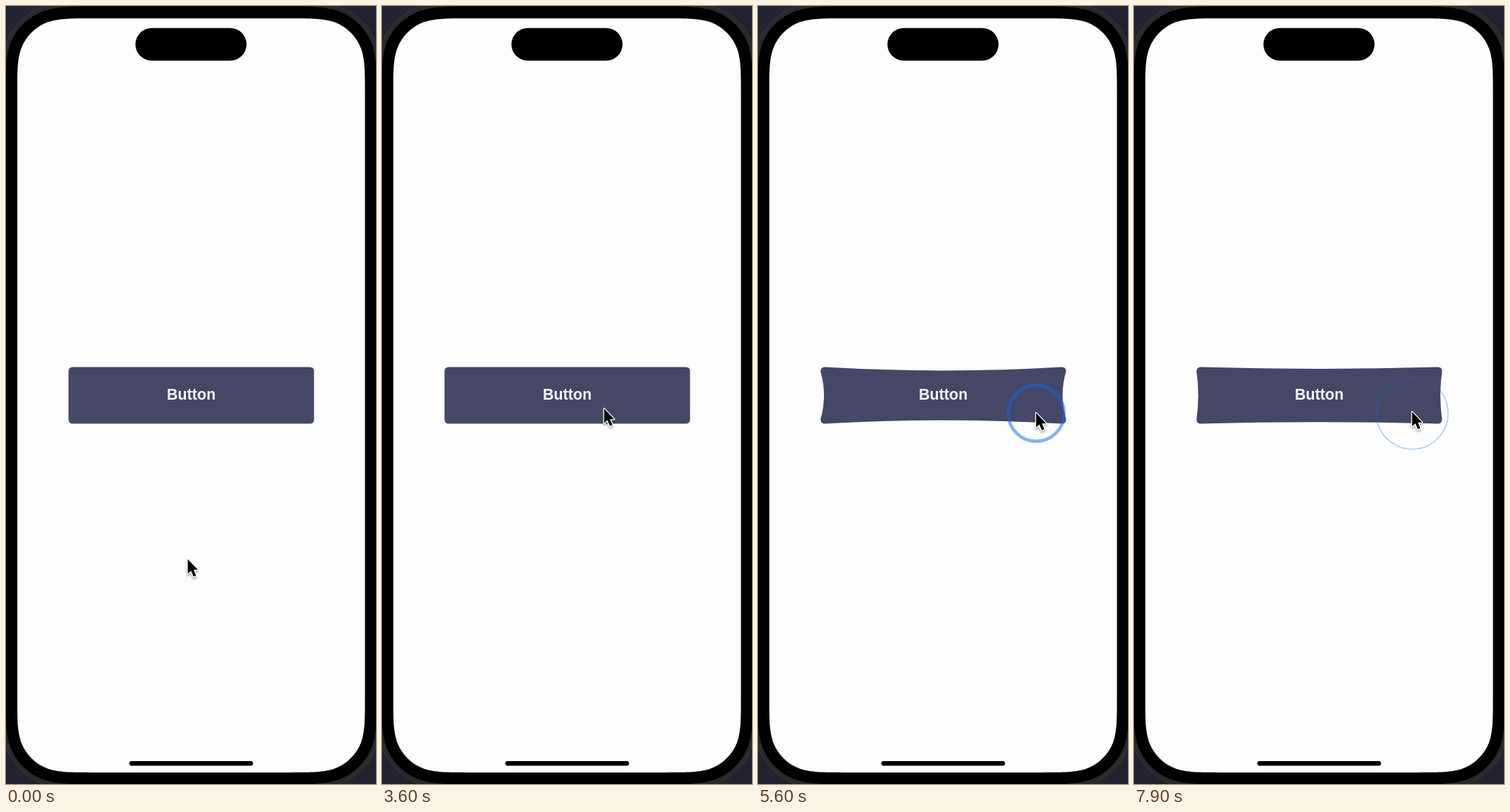
An HTML page that plays this animation: 516x1085 px, repeating every 8 s.

```html
<!DOCTYPE html>
<html lang="en">
<head>
<meta charset="utf-8">
<title>Springy button</title>
<style>
  html, body { margin: 0; width: 100%; height: 100%; overflow: hidden; background: #232230; }
  svg { display: block; width: 516px; height: 1085px; }
  text { font: bold 21.2px "Liberation Sans", Arial, sans-serif; }
</style>
</head>
<body>
<svg viewBox="0 0 516 1085" width="516" height="1085">
  <defs>
    <filter id="shadow" x="-50%" y="-50%" width="200%" height="200%">
      <feDropShadow dx="0" dy="2" stdDeviation="1.6" flood-color="#000" flood-opacity=".4"/>
    </filter>
  </defs>
  <rect width="516" height="1085" fill="#232230"/>
  <path id="frame" fill="#292929" stroke="#3a3a3c"/>
  <path id="bezel" fill="#000"/>
  <path id="screen" fill="#fdfdfd"/>
  <rect x="180.5" y="30.7" width="155" height="45.6" rx="22.8"/>
  <rect x="172" y="1053" width="172.5" height="6.4" rx="3.2"/>
  <path id="button" fill="#444866"/>
  <text x="258.3" y="549" text-anchor="middle" fill="#f7f7fa">Button</text>
  <g id="rings" fill="none" stroke="#0d69f0"></g>
  <g id="cursor" filter="url(#shadow)">
    <path d="M0 0V20.2L4.5 16L8 24.2L11.6 22.7L8.1 14.7H14.1Z"
      fill="#000" stroke="#fff" stroke-width="2.6" stroke-linejoin="round" paint-order="stroke"/>
  </g>
</svg>
<script>
const LOOP = 8000, STEP = 100;
const $ = id => document.getElementById(id);
const clamp = v => Math.max(0, Math.min(1, v));
const ease = v => { v = clamp(v); return v * v * (3 - 2 * v); };

const taps = [
  { down: 2420, up: 3270, x: 310, y: 562 },
  { down: 3980, up: 4615, x: 388, y: 568 },
  { down: 5290, up: 5605, x: 388, y: 568 },
  { down: 6620, up: 6960, x: 388, y: 568 },
  { down: 7150, up: 7310, x: 388, y: 568 },
  { down: 7430, up: 7680, x: 388, y: 568 }
];

// Cursor moves: start, end, dx, dy
const moves = [
  [1320, 2210, 56.3, -210],
  [3650, 3960, 78, 6],
  [6640, 6700, 0, -1.5]
];

// One continuous corner: bezier points along the two edges, in radii
const corner = [
  [0, 1.5287], [0, 1.0885], [0, 0.8684], [0.0749, 0.6315],
  [0.1691, 0.3728], [0.3728, 0.1691], [0.6315, 0.0749],
  [0.8684, 0], [1.0885, 0], [1.5287, 0]
];

// Screen outline grown by d, with continuous corners
function shell(d) {
  const l = 15.7 - d, t = 17.2 - d, r = 500.6 + d, b = 1068.9 + d, q = 68 + d;
  const side = (x, y, sx, sy, flip) => {
    const pts = (flip ? [...corner].reverse() : corner)
      .map(([u, v]) => `${x + sx * u * q} ${y + sy * v * q}`);
    return `${pts[0]}C${pts.slice(1).join(" ")}`;
  };
  return "M" + [
    side(l, t, 1, 1, false), side(r, t, -1, 1, true),
    side(r, b, -1, -1, false), side(l, b, 1, -1, true)
  ].join("L") + "Z";
}

// Button whose edges bow inward by `bend` pixels at their middles
function buttonPath(bend) {
  const l = 87.2, t = 503.6, r = 429.6, b = 582.6, q = 6, e = 2 * bend;
  const cx = (l + r) / 2, cy = (t + b) / 2;
  return `M${l + q} ${t}Q${cx} ${t + e} ${r - q} ${t}Q${r} ${t} ${r} ${t + q}` +
    `Q${r - e} ${cy} ${r} ${b - q}Q${r} ${b} ${r - q} ${b}` +
    `Q${cx} ${b - e} ${l + q} ${b}Q${l} ${b} ${l} ${b - q}` +
    `Q${l + e} ${cy} ${l} ${t + q}Q${l} ${t} ${l + q} ${t}Z`;
}

// Step response of an underdamped spring, after a short touch delay
function spring(ms) {
  const s = (ms - 25) / 1000, w = 6.7, k = 3.7;
  if (s <= 0) return 0;
  return 1 - Math.exp(-k * s) * (Math.cos(w * s) + k / w * Math.sin(w * s));
}

const rings = taps.map(tap => {
  const c = document.createElementNS("http://www.w3.org/2000/svg", "circle");
  c.setAttribute("cx", tap.x);
  c.setAttribute("cy", tap.y);
  $("rings").append(c);
  return c;
});

function drawRing(ring, tap, t) {
  const grow = clamp((t - tap.down) / 300), out = clamp((t - tap.up) / 300);
  const shown = t > tap.down && out < 1;
  ring.setAttribute("r", 24 + 15 * grow + 15 * out);
  ring.setAttribute("stroke-width", 4.5 * (1 - out));
  ring.setAttribute("stroke-opacity", shown ? 0.5 * clamp(grow * 2) * (1 - 0.2 * out) : 0);
}

function draw(t) {
  let bend = 0, x = 253.5, y = 771.6;
  taps.forEach((tap, i) => {
    bend += 5 * (spring(t - tap.down) - spring(t - tap.up));
    drawRing(rings[i], tap, t);
  });
  for (const [from, to, dx, dy] of moves) {
    const p = ease((t - from) / (to - from));
    x += dx * p;
    y += dy * p;
  }
  $("button").setAttribute("d", buttonPath(bend));
  $("cursor").setAttribute("transform", `translate(${x} ${y})`);
}

$("frame").setAttribute("d", shell(22));
$("bezel").setAttribute("d", shell(16.5));
$("screen").setAttribute("d", shell(0));

const start = performance.now();
function tick() {
  const t = (performance.now() - start) % LOOP;
  draw(Math.floor(t / STEP) * STEP);
  requestAnimationFrame(tick);
}
tick();
</script>
</body>
</html>
```
